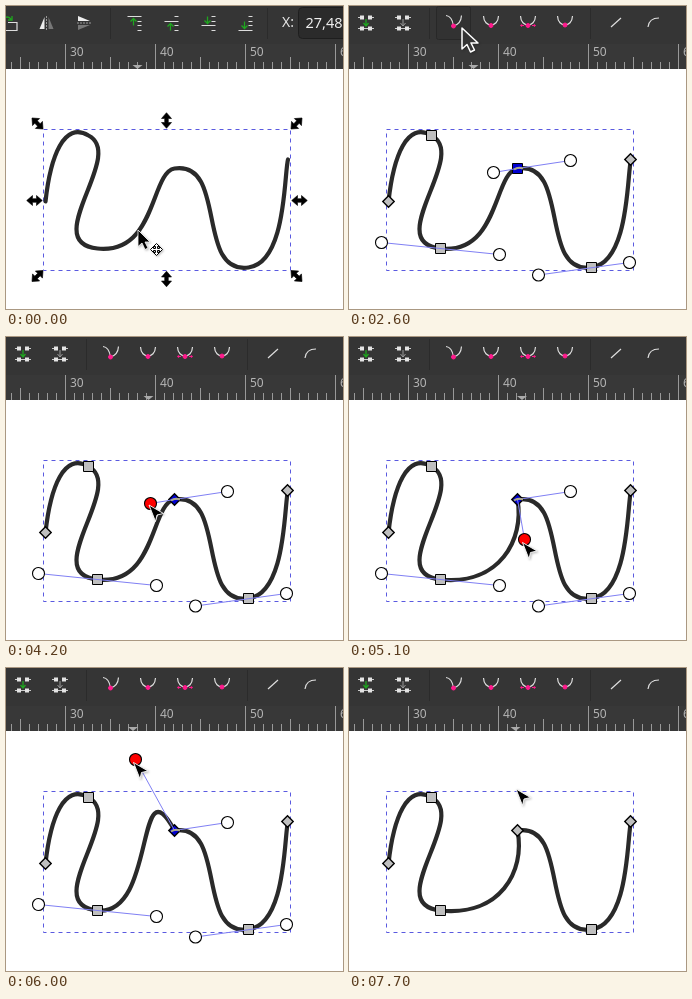
An HTML page for the animation above (8000 ms loop, 337x303 px).

```html
<!DOCTYPE html>
<html lang="en">
<head>
<meta charset="utf-8">
<title>Node editing</title>
<style>
  html, body { margin: 0; width: 100%; height: 100%; overflow: hidden; background: #fff; }
  svg { display: block; width: 337px; height: 303px; font-family: "Noto Sans", "Open Sans", sans-serif; }
  .icon { fill: none; stroke: #ddd; stroke-width: 1.2; }
  .green { stroke: #1fa51f; fill: none; stroke-width: 1.3; }
  .pink { fill: #ff1a8c; stroke: #ff1a8c; stroke-width: 1; }
  .separator { stroke: #2b2b2b; }
  .node { fill: #bfbfbf; stroke: #000; }
  .diamond { stroke-width: 1.4; }
  .knob { fill: #fff; stroke: #000; stroke-width: 1.1; }
  .lever { stroke: #8080f4; fill: none; }
  #cursor { filter: drop-shadow(1px 1px 1px #0004); }
</style>
</head>
<body>
<svg viewBox="0 0 337 303">
  <defs>
    <path id="scale" d="M0-7.800L5-2H1.800V2H5L0 7.800L-5 2H-1.800V-2H-5Z" stroke="#000" stroke-width=".6"/>
    <path id="move" d="M0-6L3-3H1V-1H3V-3L6 0L3 3V1H1V3H3L0 6L-3 3H-1V1H-3V3L-6 0L-3-3V-1H-1V-3H-3Z" fill="#fff" stroke="#000"/>
    <path id="head" d="M0 0L14.500 8.500L8 10L6.500 16.500Z" stroke="#fff" stroke-width=".9" stroke-linejoin="round"/>
    <g id="join" fill="none" stroke="#ccc">
      <path d="M-8-5.500H8M-8 5.500H8"/>
      <path d="M-6-7.500h4v4h-4ZM2-7.500h4v4h-4ZM-6 3.500h4v4h-4ZM2 3.500h4v4h-4Z" fill="#e4e4e4" stroke="none"/>
      <path d="M-2-5.500H2" stroke="#353535"/>
    </g>
  </defs>

  <rect width="337" height="38" fill="#353535"/>
  <g id="selectBar">
    <path class="separator" d="M104.500 2V33M261.500 2V33"/>
    <path class="green" d="M-2 13Q1 9 5 13M2 14L6 14L6 10"/>
    <path class="icon" d="M2 16.500h9v8h-12"/>
    <g transform="translate(40.500 17)">
      <path d="M-2-6V6H-7Z" fill="#eee"/><path d="M2-6V6H7Z" fill="#777"/>
      <path d="M0-7V7" stroke="#999" stroke-dasharray="2 1"/>
    </g>
    <g transform="translate(78 17)">
      <path d="M-6-2H6L-6-7Z" fill="#eee"/><path d="M-6 2H6L-6 7Z" fill="#777"/>
      <path d="M-7 0H7" stroke="#999" stroke-dasharray="2 1"/>
    </g>
    <g id="stackIcons"></g>
    <text x="276" y="21" font-size="14" fill="#e6e6e6">X:</text>
    <rect x="292.500" y="1.500" width="60" height="31" rx="4" fill="#2b2b2b" stroke="#1e1e1e"/>
    <text x="299.500" y="22" font-size="14.500" fill="#eee">27,48</text>
  </g>
  <g id="nodeBar">
    <path class="separator" d="M80.500 2V33M241.500 2V33"/>
    <rect id="hover" x="87.500" y=".5" width="34" height="33" rx="2" fill="#323232" stroke="#282828"/>
    <use href="#join" x="17" y="17"/>
    <path class="green" d="M17 13V20M14.500 17L17 20L19.500 17"/>
    <use href="#join" x="54" y="17"/>
    <path d="M54 13V20M51.500 17L54 20L56.500 17" fill="none" stroke="#999"/>
    <path class="icon" d="M97 9.500Q103 10 104.500 20Q112 18 112.500 9.500M134.500 10C135 22 149 22 149.500 10M171.500 10C172 22 186 22 186.500 10M208.500 10C209 22 223 22 223.500 10M262 21L272 12M299 21Q300 12 310 12"/>
    <path class="pink" d="M172 19.500H175M183 19.500H186"/>
    <g class="pink">
      <circle cx="104.500" cy="20" r="2"/><circle cx="142" cy="19.500" r="2"/><circle cx="179" cy="19.500" r="2"/><circle cx="216" cy="19" r="2"/>
      <circle cx="172.500" cy="19.500" r=".8"/><circle cx="185.500" cy="19.500" r=".8"/>
    </g>
  </g>
  <rect y="38" width="337" height="25" fill="#383838"/>
  <g id="ruler" font-size="12" fill="#b4b4b4"></g>
  <path id="marker" d="M-5 59H5L0 63Z" fill="#aaa"/>

  <rect x="37.500" y="123.500" width="247" height="141" fill="none" stroke="#5a5ae0" stroke-dasharray="4 4"/>
  <path id="curve" fill="none" stroke="#2a2a2a" stroke-width="4.200" stroke-linecap="round" stroke-linejoin="round"/>

  <g id="scaleHandles">
    <use href="#scale" x="160.500" y="114.500"/><use href="#scale" x="160.500" y="273"/>
    <use href="#scale" transform="translate(28.500 194.500) rotate(90)"/><use href="#scale" transform="translate(293.500 194.500) rotate(90)"/>
    <use href="#scale" transform="translate(31.500 117.500) rotate(-45)"/><use href="#scale" transform="translate(290.500 270) rotate(-45)"/>
    <use href="#scale" transform="translate(290.500 117.500) rotate(45)"/><use href="#scale" transform="translate(31.500 270) rotate(45)"/>
  </g>
  <g id="nodes">
    <g class="node">
      <path class="diamond" d="M39.500 189.800l5.700 5.700l-5.700 5.700l-5.700-5.700ZM281.500 147.800l5.700 5.700l-5.700 5.700l-5.700-5.700Z"/>
      <path d="M77.500 124.500h10v10h-10ZM86.500 237.500h10v10h-10ZM237.500 256.500h10v10h-10Z"/>
      <path id="active"/>
    </g>
    <g id="handles">
      <path id="levers" class="lever"/>
      <path d="M165 163.500Q169 160.500 174 162.500" fill="none" stroke="#aaa68c" stroke-width="2"/>
      <g class="knob">
        <circle cx="32.500" cy="236.500" r="6"/><circle cx="150.500" cy="248.500" r="6"/>
        <circle cx="221.500" cy="154.500" r="6"/><circle cx="189.500" cy="269" r="6"/>
        <circle cx="280.500" cy="256.500" r="6"/><circle id="knob" r="6"/>
      </g>
    </g>
  </g>
  <g id="cursor">
    <path id="arrow" d="M0 0V16.500L4 13L7 19.500L10 18L7 12H12Z" stroke="#fff" stroke-width=".8"/>
    <use id="pen" href="#head"/>
    <path id="pointer" d="M0 0V21L5 16.500L8.500 24L12.500 22L9 15H16Z" fill="#353535" stroke="#fff" stroke-width="1.500" stroke-linejoin="round"/>
    <use id="moveHint" href="#move" x="18.500" y="19.500"/>
  </g>
</svg>
<script>
const $ = id => document.getElementById(id);
const set = (id, attrs) => { for (const k in attrs) $(id).setAttribute(k, attrs[k]); };
const show = (id, on) => $(id).style.display = on ? '' : 'none';

// Rows: time, x, y
const cursorKeys = [
  [0, 132, 224], [500, 132, 224], [900, 158, 173], [1200, 169, 163], [2000, 169, 163],
  [2400, 125, 50], [2500, 125, 50], [2600, 113, 22], [2800, 113, 22], [3000, 132, 80],
  [3200, 156, 160], [3400, 157, 226], [3500, 156, 222], [4200, 143, 168]
];
const dragKeys = [
  [4300, 144.5, 166.5], [5100, 175.5, 202.5], [5200, 158, 180], [6000, 129.5, 91.5],
  [6100, 130, 93], [6700, 176.5, 204]
];
const leaveKeys = [[7200, 173, 207], [7700, 167, 121]];

function at(keys, t) {
  const i = keys.findIndex(k => k[0] > t);
  if (i < 0) return keys.at(-1).slice(1);
  if (!i) return keys[0].slice(1);
  const [a, b] = [keys[i - 1], keys[i]], u = (t - a[0]) / (b[0] - a[0]);
  return [1, 2].map(j => a[j] + (b[j] - a[j]) * u);
}

let ruler = '';
for (let n = 23; n <= 61; n++) {
  const x = 60 + (n - 30) * 9 - .5, top = n % 10 ? (n % 5 ? 56 : 51) : 38;
  ruler += `<path d="M${x} ${top}V63" stroke="#999"/>`;
  if (n % 10 === 0) ruler += `<text x="${x + 4.5}" y="50">${n}</text>`;
}
$('ruler').innerHTML = ruler;

// Long line at y, arrow ending at the line, short lines for the other layers
const stackIcon = (x, y, dir) => {
  const rows = [-7, -2, 2, 7].filter(row => row !== y).map(row => `M3 ${row}H7`).join('');
  return `<g transform="translate(${x}.5 17.5)">
    <path class="icon" d="M-7 ${y}H7${rows}"/>
    <path class="green" d="M-1 ${y + 9 * dir}V${y + 2 * dir}M-4 ${y + 5 * dir}L-1 ${y + 2 * dir}L2 ${y + 5 * dir}"/></g>`;
};
$('stackIcons').innerHTML = stackIcon(128, -7, 1) + stackIcon(165, -2, 1) + stackIcon(202, 2, -1) + stackIcon(239, 7, -1);

function draw(now) {
  const t = Math.floor(now % 8000 / 100) * 100;
  const editing = t >= 300, cusp = t >= 2900;
  const inBar = t >= 2600 && t < 2900, selected = t >= 1700 && t < 7700;
  const overNode = t >= 1200 && t < 2100, overKnob = t >= 4100 && t < 7300;
  const [hx, hy] = at(dragKeys, t);
  const [x, y] = t <= 4200 ? at(cursorKeys, t)
    : t < 7300 ? [hx - 2, hy + 3] : at(leaveKeys, t);

  show('selectBar', !editing);
  show('nodeBar', editing);
  show('scaleHandles', !editing);
  show('nodes', editing);
  show('handles', selected);
  show('hover', inBar);

  set('curve', { d: `M39.500 195.500C44.500 150 58 115 82.500 129.500C120.500 149 32.500 236.500 91.500 242.500
    C150.500 248.500 ${hx} ${hy} 168.500 162.500C221.500 154.500 189.500 269 242.500 261.500C280.500 256.500 278 168 282 153.500` });
  set('levers', { d: `M32.500 236.500L150.500 248.500M${hx} ${hy}L168.500 162.500L221.500 154.500M189.500 269L280.500 256.500` });
  set('knob', { cx: hx, cy: hy, fill: overKnob ? '#f00' : '#fff' });
  set('active', {
    d: cusp ? 'M168.500 156.800l5.700 5.700l-5.700 5.700l-5.700-5.700Z' : 'M163.500 157.500h10v10h-10Z',
    class: cusp ? 'diamond' : '',
    fill: overNode ? '#f00' : selected ? '#0000d0' : '#bfbfbf'
  });

  const overCurve = t >= 400 && t < 1200;
  show('arrow', t < 400);
  show('pen', t >= 400 && !inBar);
  show('pointer', inBar);
  show('moveHint', t < 1200);
  set('pen', { fill: overCurve ? '#777' : '#000', stroke: '#000' });
  set('cursor', { transform: `translate(${x} ${y})` });
  set('marker', { transform: `translate(${inBar ? 124.5 : x - .5} 0)` });
}

function tick() {
  draw(performance.now());
  requestAnimationFrame(tick);
}
tick();
</script>
</body>
</html>
```
